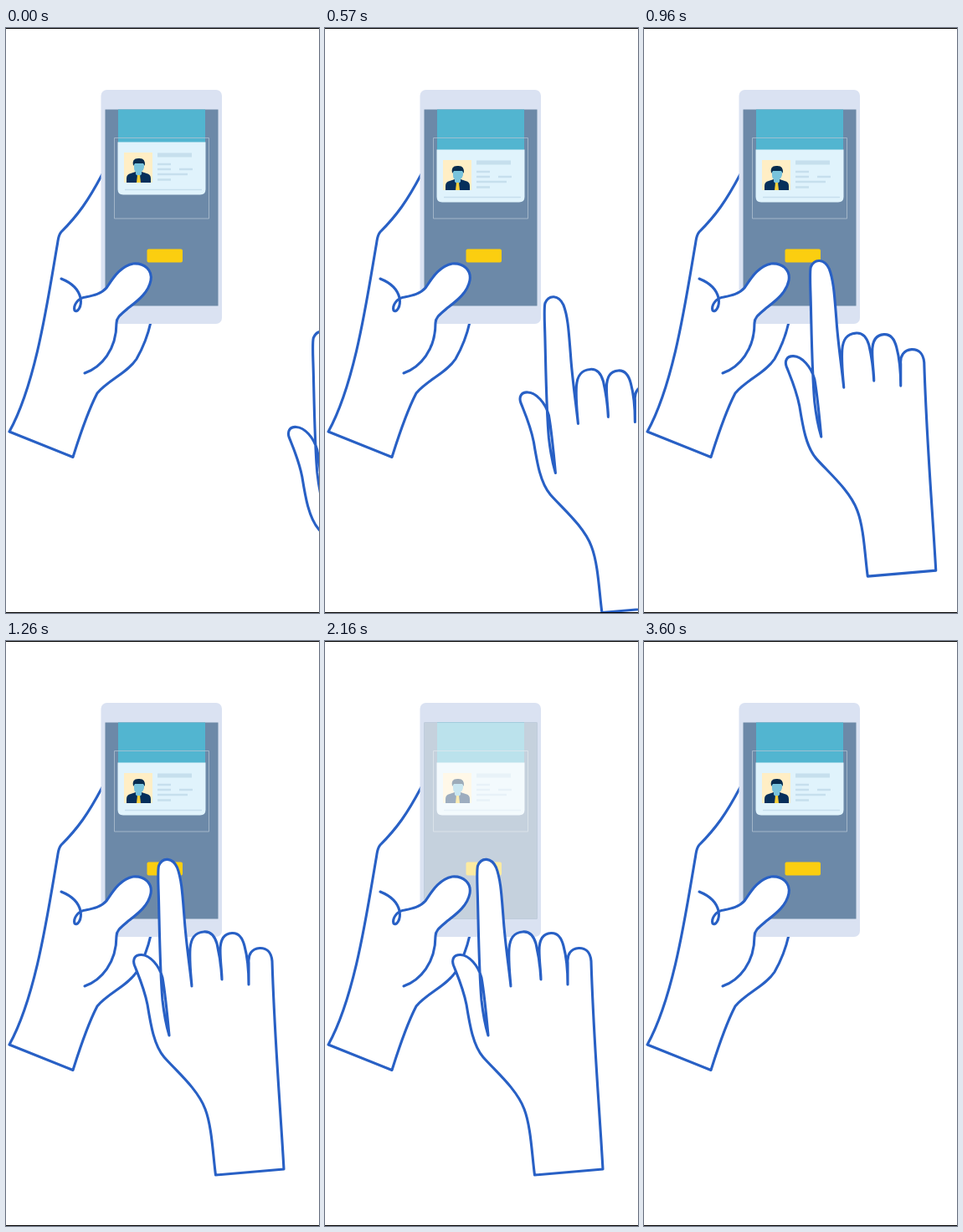
Animation of 374 by 700 pixels, one loop 3.63 s. Source, as an HTML page:

```html
<!DOCTYPE html>
<html lang="en">
<head>
<meta charset="utf-8">
<title>Scan a card with a phone</title>
<style>
html, body { margin: 0; width: 100%; height: 100%; overflow: hidden; background: #fff; }
svg { display: block; }
.line { fill: none; stroke: #2860c5; stroke-width: 3.1; stroke-linecap: round; stroke-linejoin: round; }
.skin { fill: #fff; }
</style>
</head>
<body>
<svg width="374" height="700" viewBox="0 0 374 700">
  <clipPath id="screen"><path d="M118.500 97.500H253.500V332.500H118.500Z"/></clipPath>

  <path class="line" d="M115 175C98 207 86 224 66 244C62.500 248 62.500 252 61.500 258C50 325 36 425 4 483L80 513.500C88 488 97 460 109 437C122 421 145 413 156 396C164 382 169 370 173 352"/>

  <!-- phone -->
  <rect x="113.500" y="74" width="144.500" height="280" rx="7" fill="#dae2f2"/>
  <g clip-path="url(#screen)">
    <path d="M118 97H254V333H118Z" fill="#6c89a8"/>
    <g id="card">
      <path d="M134 80H238V147H134Z" fill="#52b5d0"/>
      <path d="M133.500 145.500H238.500V202Q238.500 208.500 232 208.500H140Q133.500 208.500 133.500 202Z" fill="#e0f3fc"/>
      <path d="M141 158H175V194H141Z" fill="#ffeec5"/>
      <path d="M144 194V189Q144 184 149 183L155 181H162L168 183Q173 184 173 189V194Z" fill="#062f5b"/>
      <path d="M153 169H165V176Q164 180 162 181V184L158.500 187L155 184V181Q153 180 153 176Z" fill="#79c3dc"/>
      <path d="M157 185H160L161 194H156Z" fill="#f6cf3a"/>
      <path d="M152 174Q150 165 158 165Q167 164 166 174L164 171H154Z" fill="#062b4e"/>
      <path d="M181 158.500H222V163.500H181Z" fill="#c6dfed"/>
      <path d="M181 172H197M181 178H197M207 178H223M181 184H217M181 190.500H197" stroke="#c6dfed" stroke-width="2.500"/>
      <path d="M142 202.500H234" stroke="#c6dfed" stroke-width="1.500"/>
    </g>
    <path d="M129.500 131.500H242.500V228H129.500Z" fill="none" stroke="#b4c4d3" stroke-opacity=".75"/>
    <rect x="168.500" y="264.500" width="42.500" height="16" rx="2" fill="#fbce10"/>
    <path id="flash" d="M118 97H254V333H118Z" fill="#fff" opacity="0"/>
  </g>

  <!-- thumb over the phone -->
  <path class="skin" d="M112 317L120 311C127 301 136 285 152 282C166 281 175 290 173 302C170 318 155 328 145 336C138 342 132 346 132 353V358H112Z"/>
  <path class="line" d="M66 300C76 304 86 310 89 323C91 334 85 341 82 338C80 332 86 323 95 322C105 320 114 318 120 311C127 301 136 285 152 282C166 281 175 290 173 302C170 318 155 328 145 336C138 342 132 346 132 353C132 385 114 406 94 413"/>

  <path id="hand" class="line" style="fill:#fff" d="M195 472C193 450 190 420 187 403C183 388 172 376 162 375.500C154 375 151 381 153.500 388C159 402 165 415 169 435C173 460 177 484 189 498C204 515 229 536 238 560C246 581 247 612 250.500 639L332 632C328 560 321 480 318 383C317 372 311 367 303 367.500C294 368 289 375 290 385V411C290 390 288 376 285 365C282 353 277 349 270 349.500C260 350 256 358 256 370C256 385 258 395 258 405C257 385 255 375 252 362C249 352 244 347 236 348C226 349 221 355 220 368C219 385 221 400 222 413C219 385 215 360 213 330C211 305 210 285 204.500 271C199 259 187 258 182.500 269C181 275 182 290 182.500 310C183.500 350 184 395 187 430C189 448 192 462 195 472Z"/>
  <path d="M0 .500H374M0 699.500H374" stroke="#000"/>
</svg>
<script>
const LOOP = 3630;
const part = id => document.getElementById(id);
const card = part('card'), hand = part('hand'), flash = part('flash');
const span = (t, from, to) => Math.min(1, Math.max(0, (t - from) / (to - from)));
const move = (el, x, y) => el.setAttribute('transform', `translate(${x} ${y})`);

function draw(now) {
  const t = now % LOOP;

  move(card, 0, -9 * (1 - span(t, 0, 240)) ** 2);

  // The hand travels at an even speed along a bent path.
  const u = span(t, 0, 1080);
  move(hand,
    185 - u * (197.7 + 14.7 * u - 27.4 * u * u),
    102 - u * (67.6 + 5.6 * u + 28.8 * u * u));
  hand.setAttribute('visibility', t < 3600 ? 'visible' : 'hidden');

  flash.setAttribute('opacity', 0.7 * (span(t, 1880, 2130) - span(t, 2130, 2370)));
  requestAnimationFrame(draw);
}
requestAnimationFrame(draw);
</script>
</body>
</html>
```
